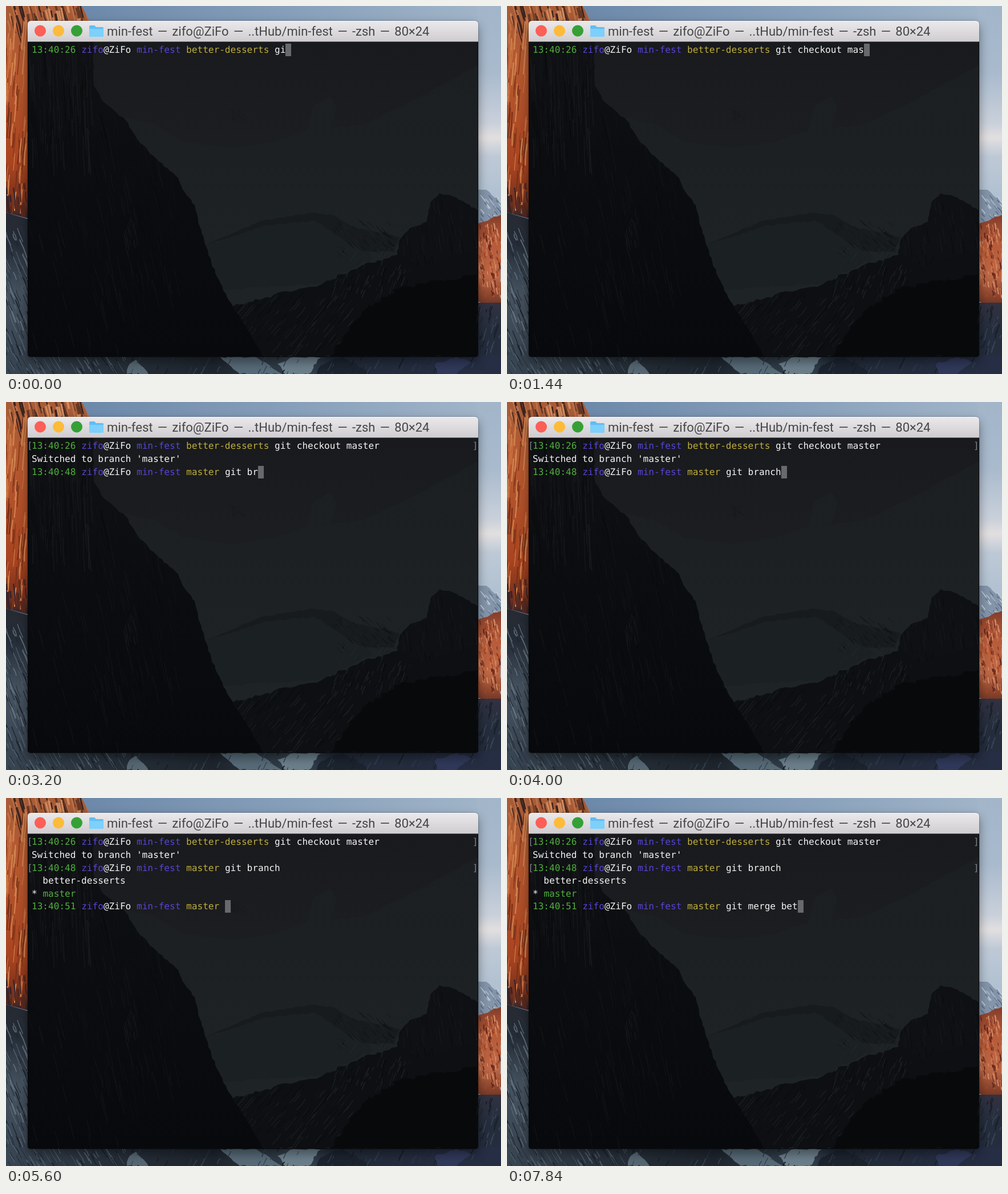
An HTML page with a canvas for the animation above (8 s loop, 868 px wide and 645 px high).

```html
<!DOCTYPE html>
<html lang="en">
<head>
<meta charset="utf-8">
<title>Terminal</title>
<style>
html, body { margin: 0; width: 100%; height: 100%; overflow: hidden; background: #20262f; }
#stage { position: relative; width: 868px; height: 645px; overflow: hidden; }
canvas, svg { position: absolute; left: 0; top: 0; }
#shadow { position: absolute; left: 38px; top: 26px; width: 790px; height: 589px; border-radius: 6px 6px 5px 5px;
  box-shadow: 0 8px 18px rgba(0,0,0,.4), 0 0 2px rgba(0,0,0,.5); }
#screen { position: absolute; left: 45px; top: 66.4px; color: #f4f4f4;
  font: 16.08px/22.6px "DejaVu Sans Mono", monospace; text-rendering: geometricPrecision; }
.line { position: relative; height: 22.6px; white-space: pre; }
.time { color: #4fb03c; }
.blue { color: #5745d6; }
.branch { color: #bfae3c; }
.mark { position: absolute; top: 0; color: #78828c; }
.cursor { display: inline-block; width: 10px; height: 22px; background: #68696c; vertical-align: top; }
</style>
</head>
<body>
<div id="stage">
  <canvas id="outside" width="868" height="645"></canvas>
  <div id="shadow"></div>
  <canvas id="inside" width="868" height="645"></canvas>
  <svg width="868" height="645">
    <defs>
      <linearGradient id="bar" x1="0" y1="0" x2="0" y2="1">
        <stop offset="0" stop-color="#ebe9eb"/><stop offset="1" stop-color="#cfcdcf"/>
      </linearGradient>
    </defs>
    <path d="M38 62V32q0-6 6-6H822q6 0 6 6V62Z" fill="url(#bar)"/>
    <path d="M43 26.5H823" stroke="#f7f6f7"/>
    <path d="M38 62.5H828" stroke="#77777a"/>
    <circle cx="60" cy="43.5" r="10" fill="#fb5f57"/>
    <circle cx="92" cy="43.5" r="10" fill="#fdbb3a"/>
    <circle cx="124" cy="43.5" r="10" fill="#35a036"/>
    <path d="M146 52V36q0-2 2-2h7l3 3h11q2 0 2 2V52q0 2-2 2H148q-2 0-2-2Z" fill="#62bdf3"/>
    <path d="M146 40H171V52q0 2-2 2H148q-2 0-2-2Z" fill="#7dd0fb"/>
    <text x="177" y="51.5" fill="#464547" font-size="22" word-spacing="2.9"
      font-family="Roboto, sans-serif">min-fest — zifo@ZiFo — ..tHub/min-fest — -zsh — 80×24</text>
  </svg>
  <div id="screen"></div>
</div>
<script>
const LOOP = 8000, STEP = 160;
let seed = 7;
const rand = () => (seed = (seed * 16807) % 2147483647) / 2147483647;
const between = (a, b) => a + rand() * (b - a);
const pick = list => list[Math.floor(rand() * list.length)];

function painter(id) {
  const c = document.getElementById(id).getContext('2d');
  return {
    c,
    fade(x0, y0, x1, y1, stops) {
      const g = c.createLinearGradient(x0, y0, x1, y1);
      stops.forEach(([at, color]) => g.addColorStop(at, color));
      return g;
    },
    // Polygon whose edges are broken up by "rough" pixels.
    shape(fill, points, rough = 0) {
      c.fillStyle = fill;
      c.beginPath();
      points.forEach(([x, y], i) => {
        const [nx, ny] = points[(i + 1) % points.length];
        const n = rough ? Math.ceil(Math.hypot(nx - x, ny - y) / 7) : 1;
        for (let k = 0; k < n; k++) {
          const j = k ? rough : 0;
          c.lineTo(x + (nx - x) * k / n + between(-j, j), y + (ny - y) * k / n + between(-j, j));
        }
      });
      c.fill();
    },
    streaks(n, [x, y, w, h], colors, slope, length, width = 1.5) {
      for (let i = 0; i < n; i++) {
        const px = x + rand() * w, py = y + rand() * h, l = length * between(.3, 1);
        c.strokeStyle = pick(colors);
        c.lineWidth = width * between(.4, 1);
        c.beginPath();
        c.moveTo(px, py);
        c.lineTo(px + l * slope / 2 + between(-1.5, 1.5), py + l / 2);
        c.lineTo(px + l * slope, py + l);
        c.stroke();
      }
    },
    clip(points, draw) {
      c.save();
      c.beginPath();
      points.forEach(p => c.lineTo(...p));
      c.clip();
      draw();
      c.restore();
    }
  };
}

function paintOutside() {
  const p = painter('outside'), { c } = p;
  const rect = (fill, x, y, w, h) => { c.fillStyle = fill; c.fillRect(x, y, w, h); };
  rect(p.fade(140, 0, 868, 0, [[0, '#6d89aa'], [.5, '#879fba'], [1, '#a4b7ca']]), 0, 0, 868, 645);
  rect(p.fade(0, 0, 0, 330, [[0, '#a2b5c9'], [.35, '#a9bacd'], [.62, '#c9d0da'], [.7, '#e2dfe0'], [.8, '#bec9d6'], [1, '#b1c1d1']]), 826, 0, 42, 345);

  const rock = [[0, 0], [133, 0], [148, 30], [148, 60], [38, 60], [38, 372], [0, 362]];
  p.shape(p.fade(0, 0, 0, 370, [[0, '#a65c38'], [.3, '#b65930'], [.75, '#a94420'], [.93, '#76301c'], [1, '#30252a']]), rock);
  p.clip(rock, () => {
    p.streaks(70, [0, -15, 140, 45], ['#3c241f', '#653724', '#d18a5c', '#bb7047'], .25, 40, 4);
    p.streaks(70, [0, 20, 38, 310], ['#753019', '#c9703f', '#d08450', '#8c3a1c'], -.08, 55, 2.5);
    p.streaks(14, [0, 310, 38, 40], ['#39242a', '#58291f'], .1, 35, 4);
  });

  const slope = [[0, 362], [40, 374], [40, 645], [0, 645]];
  p.shape(p.fade(0, 362, 0, 645, [[0, '#272a32'], [.2, '#242c37'], [.5, '#45525f'], [.8, '#3b4754'], [1, '#333e4a']]), slope);
  p.clip(slope, () => p.streaks(110, [-15, 385, 55, 255], ['#1d242d', '#65747f', '#546370', '#29323c'], .4, 35, 2));

  // Snowy peak, autumn trees and shade on the right.
  p.shape('#8495aa', [[826, 321], [842, 322], [868, 344], [868, 385], [826, 390]], 1);
  p.streaks(30, [828, 330, 38, 45], ['#c5d0dc', '#5f7087', '#b0bdcc'], .8, 12, 2);
  p.shape(p.fade(0, 370, 0, 520, [[0, '#873f2b'], [.3, '#b75b3a'], [.7, '#bd6745'], [1, '#793925']]), [[826, 382], [868, 366], [868, 522], [826, 518]], 2);
  p.streaks(120, [828, 380, 40, 125], ['#63291f', '#d28a66', '#a44828', '#c9734d'], .15, 13, 2.5);
  rect(p.fade(0, 518, 0, 645, [[0, '#333241'], [.4, '#242d3b'], [1, '#252d40']]), 826, 520, 42, 125);
  p.streaks(40, [828, 525, 40, 110], ['#181f29', '#39465a'], -.3, 16, 2);

  rect(p.fade(0, 0, 868, 0, [[0, '#394653'], [.2, '#27303a'], [.42, '#1e252d'], [.6, '#354451'], [.66, '#222b38'], [1, '#262e45']]), 0, 612, 868, 33);
  p.streaks(80, [0, 605, 210, 38], ['#1a2129', '#4e5f6c', '#2b3641'], .6, 25, 2);
  p.shape('#566773', [[214, 632], [228, 620], [250, 645], [212, 645]], 2);
  p.shape('#576a77', [[376, 615], [438, 615], [484, 645], [410, 645]], 2);
  p.shape('#6b7f8b', [[476, 627], [505, 615], [552, 616], [530, 645], [490, 645]], 2);
  p.shape('#1c2430', [[552, 630], [590, 614], [640, 645], [545, 645]], 2);
  p.streaks(60, [220, 610, 640, 35], ['#171d25', '#344251', '#29334a'], -.5, 18, 2);
  p.shape('#30395a', [[752, 628], [790, 615], [815, 625], [790, 645], [756, 645]], 2);
}

function paintInside() {
  const p = painter('inside'), { c } = p;
  c.beginPath();
  c.roundRect(38, 60, 790, 555, [0, 0, 5, 5]);
  c.clip();
  c.fillStyle = p.fade(0, 62, 0, 615, [[0, '#191a1d'], [.3, '#1b1d20'], [1, '#1c2124']]);
  c.fillRect(38, 60, 790, 555);
  p.shape(p.fade(0, 100, 0, 500, [[0, '#1c1f22'], [.4, '#1c2023'], [1, '#1e2326']]), [
    [160, 190], [210, 196], [260, 207], [310, 238], [400, 249], [480, 235], [528, 218], [540, 174], [568, 158],
    [579, 177], [570, 215], [630, 206], [715, 165], [828, 104], [828, 615], [160, 615]], 1.5);
  p.streaks(25, [390, 178, 25, 22], ['#15171a'], 1, 7, 1);

  // Distant ridge.
  p.shape('#171b1e', [[352, 417], [450, 376], [535, 362], [575, 367], [592, 378], [612, 388], [690, 405],
    [680, 430], [620, 430], [575, 400], [510, 380], [440, 394]], 1);
  p.shape('#1b2023', [[350, 420], [450, 386], [540, 376], [590, 408], [645, 440], [560, 485], [350, 500]], 2);
  p.streaks(70, [570, 375, 110, 55], ['#101316', '#1d2225'], 1, 14, 1.5);
  p.streaks(40, [580, 415, 100, 50], ['#14181b', '#22282b'], -.7, 15, 1);

  const dome = [[690, 410], [708, 390], [738, 378], [744, 345], [760, 328], [790, 336], [828, 359], [828, 615], [660, 615], [682, 455]];
  p.shape('#0e1013', dome, 1.5);
  p.clip(dome, () => {
    p.streaks(80, [690, 340, 138, 130], ['#15181b', '#090b0e', '#171a1d'], .15, 35, 1.5);
    p.streaks(60, [680, 440, 148, 60], ['#171a1d', '#0a0c0f'], -.5, 18, 1.5);
  });

  const foothills = [[398, 526], [445, 515], [490, 500], [545, 492], [590, 470], [640, 450], [690, 435], [725, 455], [828, 425], [828, 615], [400, 615]];
  p.shape('#0d0f12', foothills, 3);
  p.clip(foothills, () => {
    p.streaks(120, [400, 500, 210, 95], ['#181c1f', '#1b2023', '#090b0d'], -.8, 26, 1.5);
    p.streaks(90, [570, 445, 140, 60], ['#1b2023', '#171b1e', '#090b0e'], -.4, 16, 1.8);
  });
  p.shape('#07090b', [[570, 615], [590, 580], [625, 535], [690, 495], [760, 480], [828, 470], [828, 615]], 4);

  const cliff = [[38, 60], [153, 60], [154, 140], [170, 167], [210, 200], [235, 240], [264, 268], [302, 302],
    [313, 326], [331, 349], [343, 398], [360, 449], [381, 499], [410, 545], [430, 578], [451, 615], [38, 615]];
  p.shape(p.fade(0, 62, 0, 615, [[0, '#101114'], [.35, '#0b0d10'], [1, '#07090c']]), cliff, 1.3);
  p.clip(cliff, () => {
    p.streaks(120, [40, 55, 112, 190], ['#17181a', '#0a0b0d', '#131518'], .04, 80, 2);
    p.streaks(120, [150, 170, 150, 350], ['#0f1215', '#080a0d', '#111417'], .2, 60, 1.6);
    p.streaks(80, [38, 330, 220, 270], ['#101417', '#0c0f12'], .25, 50, 1.4);
    p.streaks(25, [205, 370, 25, 50], ['#13171a'], .2, 25, 1.5);
  });
  c.strokeStyle = '#08090b';
  c.lineWidth = 2;
  c.strokeRect(38, 60, 790, 555);
}

const commands = [
  { text: 'git checkout master', clock: '13:40:26', branch: 'better-desserts', start: -210, pace: 100, enter: 2080,
    output: ["Switched to branch 'master'"] },
  { text: 'git branch', clock: '13:40:48', branch: 'master', start: 2520, pace: 110, enter: 4160,
    output: ['  better-desserts', '* <span class="time">master</span>'] },
  { text: 'git merge better-desserts', clock: '13:40:51', branch: 'master', start: 6140, pace: 128, enter: Infinity, output: [] }
];
const span = (name, text) => `<span class="${name}">${text}</span>`;
const line = html => `<div class="line">${html}</div>`;
const bracket = (x, text) => `<span class="mark" style="left:${x}px">${text}</span>`;
const prompt = ({ clock, branch }) =>
  `${span('time', clock)} ${span('blue', 'zifo')}@ZiFo ${span('blue', 'min-fest')} ${span('branch', branch)} `;

function screenAt(t) {
  let html = '';
  for (const cmd of commands) {
    if (t < cmd.enter) {
      const count = Math.max(0, Math.floor((t - cmd.start) / cmd.pace));
      return html + line(prompt(cmd) + cmd.text.slice(0, count) + span('cursor', ''));
    }
    html += line(bracket(-8, '[') + prompt(cmd) + cmd.text + bracket(773, ']')) + cmd.output.map(line).join('');
  }
  return html;
}

const screenBox = document.getElementById('screen');
let shown = '';
function draw() {
  const t = Math.floor(performance.now() % LOOP / STEP) * STEP;
  const html = screenAt(t);
  if (html !== shown) screenBox.innerHTML = shown = html;
  requestAnimationFrame(draw);
}
paintOutside();
paintInside();
draw();
</script>
</body>
</html>
```
